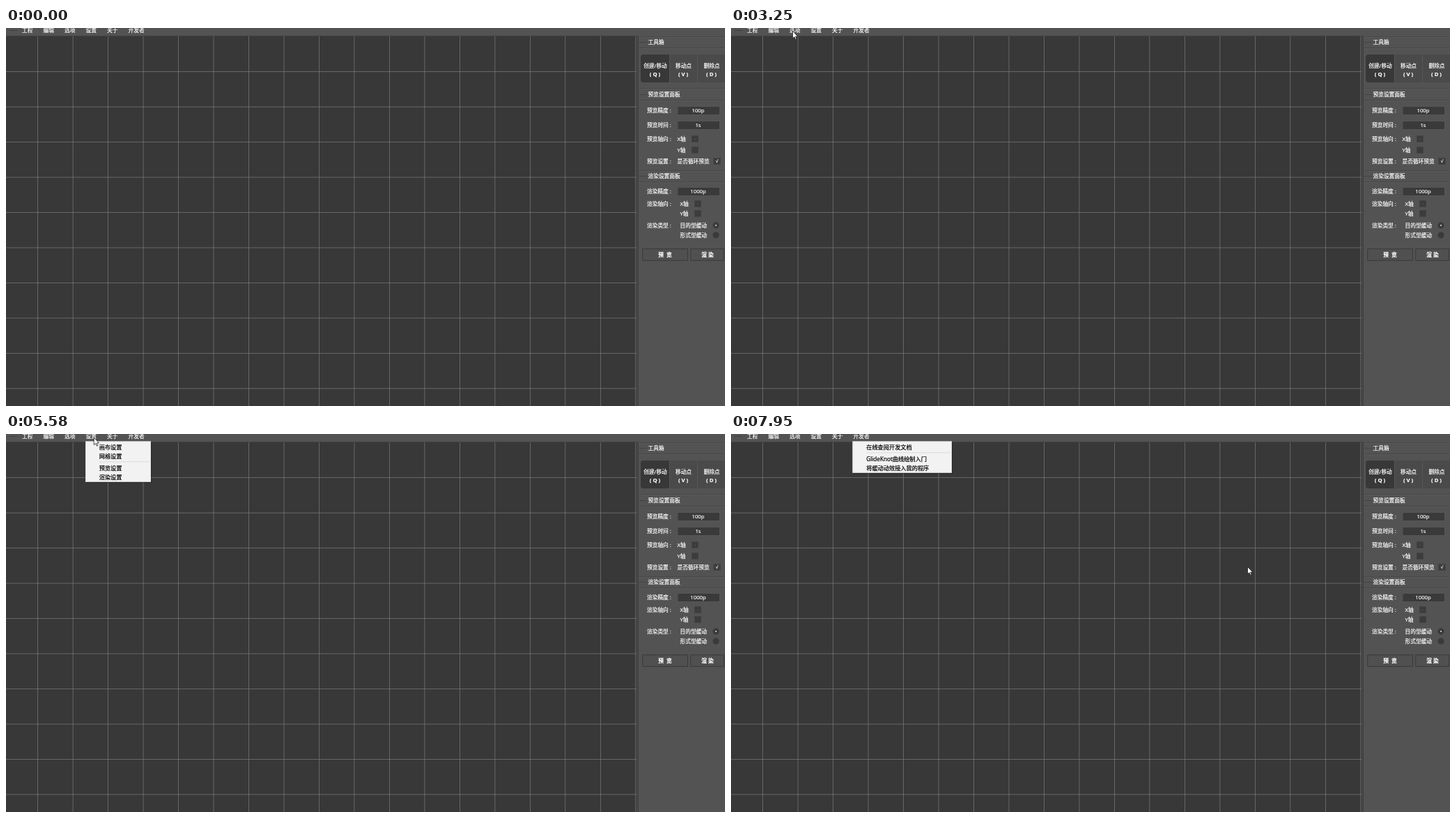
Write an HTML page with a canvas that moves like this. It is 1032 px wide and 542 px high and loops after 8000 ms.

```html
<!DOCTYPE html>
<html lang="zh-CN">
<head>
<meta charset="utf-8">
<title>缓动曲线编辑器</title>
<style>
html, body { margin: 0; width: 100%; height: 100%; overflow: hidden; background: #383838; }
canvas { display: block; }
</style>
</head>
<body>
<canvas id="stage" width="1032" height="542"></canvas>
<script>
const stage = document.getElementById('stage').getContext('2d');
const layer = new OffscreenCanvas(400, 160).getContext('2d');
let ctx = stage;
const LOOP = 8000;
const HAIRLINE = 0.64;
const FONT = '"Open Sans", "Noto Sans CJK SC", "Noto Sans CJK", sans-serif';

// Rows: "~" disabled, "*" checked, "-" separator, "|" precedes the right-hand column.
const menus = [
  { x: 22, width: 150, open: 1495, close: 2340,
    rows: ['新建|Ctrl+N', '打开|Ctrl+O', '~保存|Ctrl+S', '另存为', '关闭该工程', '-', '预览|F5', '渲染为.ecr|F12'] },
  { x: 53, width: 168, open: 2535, close: 3250,
    rows: ['删除锚点|Ctrl+D', '删除上一个锚点|Ctrl+Z', '清除控制点', '-', '清空画布', '~清空画布同时清除参考线', '-', '~添加参考线', '~清除参考线'] },
  { x: 83, width: 135.5, open: 3420, close: 5200,
    rows: ['*循环预览', '*显示网格', '*显示速率分布', '*贝塞尔辅助线', '-', '对齐与吸附|>'] },
  { x: 218, y: 66.5, width: 107, open: 4180, close: 4780,
    rows: ['对齐到网格', '对齐到锚点', '吸附到网格', '吸附参考线'] },
  { x: 114, width: 94, open: 5390, close: 6040,
    rows: ['画布设置', '网格设置', '-', '预览设置', '渲染设置'] },
  { x: 144, width: 109.5, open: 6208, close: 6780,
    rows: ['关于GlideKnot'] },
  { x: 174.5, width: 142.5, open: 6960, close: LOOP,
    rows: ['在线查阅开发文档', '-', 'GlideKnot曲线绘制入门', '将缓动动效接入我的程序'] }
];

// Pointer stops: time, x, y
const stops = [
  [30, 798, 507], [800, 51, 37], [1330, 35, 9], [1790, 35, 9], [2300, 64, 5],
  [2640, 72, 3], [3060, 88, 4], [3450, 88, 4], [3880, 105, 38], [4150, 112, 72],
  [4360, 118, 73], [4600, 118, 73], [4990, 111, 11], [5270, 120, 5], [5420, 120, 5],
  [6050, 155, 3], [6190, 155, 3], [6350, 168, 2], [6630, 186, 3], [7050, 190, 5],
  [7570, 670, 135], [7780, 772, 180], [7950, 741, 190]
];

function rect(x, y, w, h, fill, stroke) {
  ctx.fillStyle = fill;
  ctx.fillRect(x, y, w, h);
  if (stroke) {
    ctx.strokeStyle = stroke;
    ctx.lineWidth = HAIRLINE;
    ctx.strokeRect(x + HAIRLINE / 2, y + HAIRLINE / 2, w - HAIRLINE, h - HAIRLINE);
  }
}

function polyline(points, color, width) {
  ctx.beginPath();
  points.forEach(([x, y]) => ctx.lineTo(x, y));
  ctx.strokeStyle = color;
  ctx.lineWidth = width;
  ctx.stroke();
}

function text(label, x, middle, { size = 7.7, color = '#fff', align = 'left', weight = 400 } = {}) {
  const baseline = middle + size * 0.37;
  ctx.font = `${weight} ${size}px ${FONT}`;
  ctx.textAlign = align;
  ctx.fillStyle = ctx.strokeStyle = color;
  ctx.fillText(label, x, baseline);
  ctx.lineWidth = 0.2;
  ctx.strokeText(label, x, baseline);
}

const centered = (label, x, y, weight) => text(label, x, y, { align: 'center', weight });

function drawGrid() {
  rect(0, 0, 1032, 542, '#383838');
  for (let x = 45.6; x < 905; x += 50.48) rect(x - HAIRLINE / 2, 12, HAIRLINE, 530, '#808080');
  for (let y = 62.6; y < 542; y += 50.48) rect(0, y - HAIRLINE / 2, 905, HAIRLINE, '#808080');
}

function drawMenuBar() {
  rect(0, 0, 1032, 11, '#535353');
  rect(0, 11, 908, 1, '#424242');
  rect(5, 3, 11, 1, '#414141');
  ['工程', '编辑', '选项', '设置', '关于', '开发者'].forEach((label, i) => text(label, 23 + i * 30.5, 3.5));
}

function panelHeader(label, middle, top, bottom) {
  for (const y of [top, bottom]) {
    rect(908, y, 124, HAIRLINE, '#404040');
    rect(908, y + 1, 124, HAIRLINE, '#5e5e5e');
  }
  rect(909, Math.floor(middle), 11, HAIRLINE, '#3a3a3a');
  text(label, 921.5, middle);
}

function field(value, y) {
  rect(963.7, y - 6, 61, 13, '#3a3a3a', '#646464');
  centered(value, 993.5, y + 0.5);
}

function checkbox(x, y, mark = '') {
  rect(x, y - 5, 10, 10, '#3c3c3c', '#484848');
  if (mark) text(mark, x + 5, y, { size: 6, align: 'center', color: mark === '√' ? '#eee' : '#888' });
}

function radio(y, selected) {
  ctx.beginPath();
  ctx.arc(1019, y, 4.5, 0, 7);
  ctx.fillStyle = '#3a3a3a';
  ctx.fill();
  ctx.strokeStyle = '#464646';
  ctx.lineWidth = HAIRLINE;
  ctx.stroke();
  if (selected) rect(1018, y - 1, 2, 2, '#bbb');
}

function drawPanel() {
  rect(905, 12, 3, 530, '#4a4a4a');
  rect(906.8, 12, HAIRLINE, 530, '#343434');
  rect(908, 11, 124, 531, '#535353');

  panelHeader('工具箱', 20.5, 12, 28);
  ctx.beginPath();
  ctx.roundRect(911, 38, 130, 40, 4);
  ctx.fillStyle = '#4a4a4a';
  ctx.fill();
  ctx.beginPath();
  ctx.roundRect(911, 38, 41, 40, [4, 0, 0, 4]);
  ctx.fillStyle = '#383838';
  ctx.fill();
  rect(952, 38, HAIRLINE, 40, '#606060');
  rect(992.3, 38, HAIRLINE, 40, '#606060');
  [['创建/移动', 'Q'], ['移动点', 'V'], ['删除点', 'D']].forEach(([label, key], i) => {
    centered(label, 932 + i * 40.5, 54.5);
    centered(`( ${key} )`, 931.5 + i * 40.5, 66, 700);
  });

  panelHeader('预览设置面板', 95.5, 86, 103);
  panelHeader('渲染设置面板', 212, 204, 220);
  [['预览精度', 118.5], ['预览时间', 139], ['预览轴向', 159], ['预览设置', 191.5],
   ['渲染精度', 234.5], ['渲染轴向', 252], ['渲染类型', 283]]
    .forEach(([label, y]) => text(label + ' :', 920, y));
  field('100p', 118);
  field('1s', 139);
  field('1000p', 234);

  text('X轴', 963.5, 159);
  checkbox(984, 159, '·');
  text('Y轴', 963.5, 175);
  checkbox(984, 175);
  text('是否循环预览', 963.5, 191.5);
  checkbox(1015.5, 191, '√');
  text('X轴', 967.5, 252);
  checkbox(988, 252, '·');
  text('Y轴', 967.5, 266.5);
  checkbox(988, 266);
  text('目的型缓动', 967.5, 283.5);
  radio(283, true);
  text('形式型缓动', 967.5, 297.5);
  radio(297, false);

  rect(913.5, 316.5, 65.5, 17, '#505050', '#2c2c2c');
  centered('预  览', 946, 325, 700);
  rect(982.5, 316.5, 48.5, 17, '#505050', '#2c2c2c');
  centered('渲 染', 1007, 325, 700);
}

function drawMenuBody({ x, y = 10.5, width, rows }, height, time, pointer) {
  rect(x, y, width, height, '#f2f2f2', '#d4d4d4');

  let top = y + 1.5;
  for (const row of rows) {
    if (row === '-') {
      rect(x + 20, top + 1.5, width - 22, HAIRLINE, '#cfcfcf');
      top += 4;
      continue;
    }
    const [, flag, label, extra] = row.match(/^([~*]?)([^|]*)\|?(.*)$/);
    const middle = top + 6.5;
    const submenuOpen = extra === '>' && time >= menus[3].open && time < menus[3].close;
    const hovered = submenuOpen || (pointer.x > x && pointer.x < x + width
      && pointer.y >= top && pointer.y < top + 13);
    const color = flag === '~' ? '#7c7c7c' : '#000';
    if (hovered) rect(x + 2, top, width - 4, 13, '#91c9f7');
    if (flag === '*') {
      rect(x + 2, top, 13, 13, hovered ? '#56b0fa' : '#91c9f7');
      polyline([[x + 4.8, middle], [x + 7, middle + 2.2], [x + 11.2, middle - 2.4]], '#1b2c3c', 1.1);
    }
    text(label, x + 19.7, middle, { size: 8.2, color });
    if (extra === '>') {
      const tip = x + width - 7;
      polyline([[tip - 2.5, middle - 2.5], [tip, middle], [tip - 2.5, middle + 2.5]], '#333', 0.9);
    } else if (extra) {
      text(extra, x + width - 12, middle, { size: 8.2, color, align: 'right' });
    }
    top += 13;
  }
}

// The menu is painted on its own layer so that it fades as one piece.
function drawMenu(menu, time, pointer) {
  const { x, y = 10.5, width, open, close, rows } = menu;
  if (time < open || time >= close) return;
  const separators = rows.filter(row => row === '-').length;
  const height = 2.2 + 13 * (rows.length - separators) + 4 * separators;
  const opacity = Math.min(1, (time - open) / 150);

  layer.clearRect(0, 0, 400, 160);
  ctx = layer;
  drawMenuBody(menu, height, time, pointer);
  ctx = stage;
  if (opacity === 1) rect(x + 1.3, y + 1.3, width, height, 'rgba(0,0,0,.25)');
  ctx.globalAlpha = opacity;
  ctx.drawImage(layer.canvas, 0, 0);
  ctx.globalAlpha = 1;
}

function pointerAt(time) {
  const next = stops.findIndex(stop => stop[0] > time);
  if (next < 0) return { x: 741, y: 190 };
  if (next === 0) return { x: -99, y: -99 };
  const [t0, x0, y0] = stops[next - 1];
  const [t1, x1, y1] = stops[next];
  const p = (time - t0) / (t1 - t0);
  const eased = p * p * (3 - 2 * p);
  return { x: x0 + (x1 - x0) * eased, y: y0 + (y1 - y0) * eased };
}

function drawPointer({ x, y }) {
  ctx.save();
  ctx.translate(x + 0.5, y + 0.5);
  ctx.scale(0.63, 0.63);
  const arrow = new Path2D('M0 0V16.5L3.8 13L6.5 19L9 18L6.5 12.2H11.7Z');
  ctx.fillStyle = '#fff';
  ctx.fill(arrow);
  ctx.strokeStyle = '#111';
  ctx.lineWidth = 1.2;
  ctx.stroke(arrow);
  ctx.restore();
}

function render() {
  const time = performance.now() % LOOP;
  const pointer = pointerAt(time);
  drawGrid();
  drawMenuBar();
  drawPanel();
  menus.forEach(menu => drawMenu(menu, time, pointer));
  drawPointer(pointer);
  requestAnimationFrame(render);
}
render();
</script>
</body>
</html>
```
